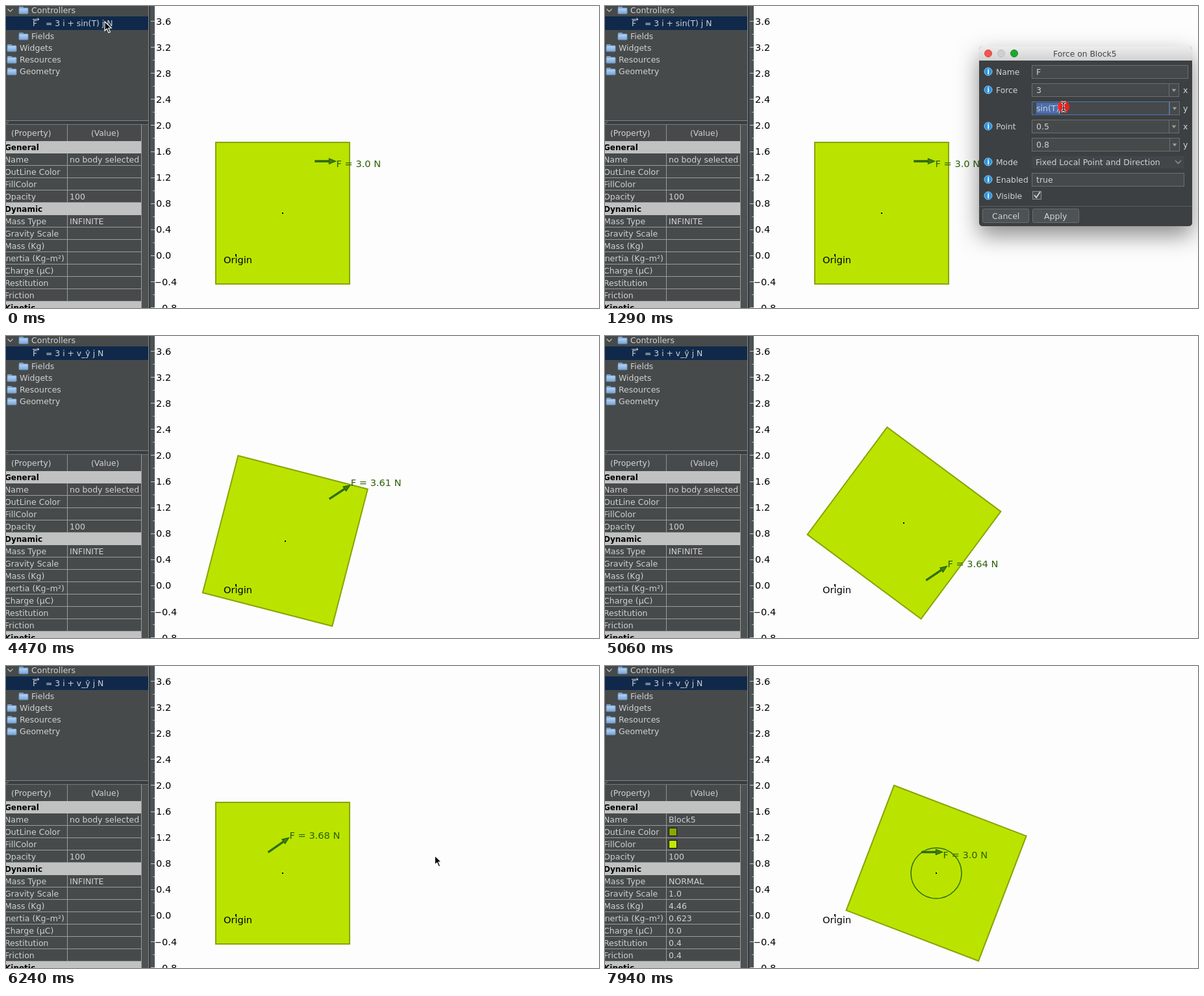
An HTML page with a canvas for the animation above (8000 ms loop, 913 by 465 pixels).

```html
<!DOCTYPE html>
<html>
<head>
<meta charset="utf-8">
<style>
html, body { margin: 0; width: 100%; height: 100%; overflow: hidden; background: #fdfdfd; }
canvas { display: block; }
</style>
</head>
<body>
<canvas id="stage" width="913" height="465"></canvas>
<script>
const c = document.getElementById('stage').getContext('2d');
const LOOP = 8000, FPS = 17, RAD = Math.PI / 180;
const FACE = '"DejaVu Sans", sans-serif';
const RUN1 = 4380, RESET = 5960, SELECT = 6590, RUN2 = 7330;
const DIALOG = 940, DIALOG_END = 3550, MENU_END = 7080;

function text(s, x, y, color = '#d0d2d3', size = 12.5, style = '') {
  c.font = `${style} ${size}px ${FACE}`;
  c.fillStyle = color;
  c.fillText(s, x, y);
}
function rect(x, y, w, h, fill, stroke) {
  if (fill) { c.fillStyle = fill; c.fillRect(x, y, w, h); }
  if (stroke) { c.lineWidth = 1; c.strokeStyle = stroke; c.strokeRect(x + .5, y + .5, w - 1, h - 1); }
}
function rounded(x, y, w, h, r, fill, stroke) {
  c.beginPath();
  c.roundRect(x, y, w, h, r);
  if (fill) { c.fillStyle = fill; c.fill(); }
  if (stroke) { c.lineWidth = 1; c.strokeStyle = stroke; c.stroke(); }
}
function dot(x, y, r, fill, stroke, width = 1) {
  c.beginPath();
  c.arc(x, y, r, 0, 7);
  if (fill) { c.fillStyle = fill; c.fill(); }
  if (stroke) { c.lineWidth = width; c.strokeStyle = stroke; c.stroke(); }
}
function lines(d, color, width = 1, fill) {
  const p = new Path2D(d);
  if (fill) { c.fillStyle = fill; c.fill(p); }
  c.lineWidth = width;
  c.strokeStyle = color;
  c.stroke(p);
}
function at(x, y, draw) {
  c.save();
  c.translate(x, y);
  draw();
  c.restore();
}

// ---- side panels ----
function folder(x, y) {
  rounded(x, y - 5, 7, 4, 1, '#7fa9d6');
  const g = c.createLinearGradient(0, y - 4, 0, y + 6);
  g.addColorStop(0, '#c3dcf5');
  g.addColorStop(1, '#78a6d8');
  rounded(x, y - 3, 14, 9, 1, g, '#6b93c0');
}
function tree(t) {
  rect(0, 0, 220, 177, '#464a4b');
  rect(0, 16, 219, 21, '#10294a');
  lines('M2.5 4.5L6.5 8.5L10.5 4.5', '#b5b8ba', 1.4);
  for (const [s, x, y] of [['Controllers', 20, 6], ['Fields', 20, 46], ['Widgets', 2, 64], ['Resources', 2, 82], ['Geometry', 2, 100]]) {
    folder(x, y);
    text(s, x + 19, y + 5);
  }
  text('F', 41, 31);
  lines('M41 20.5H51M48.5 18.5L51 20.5L48.5 22.5', '#d0d2d3');
  text(t < DIALOG_END ? '= 3 i + sin(T) j N' : '= 3 i + v_ŷ j N', 61, 31, '#d0d2d3', 12.4);
  rect(0, 176, 220, 1, '#808485');
  rect(219, 0, 1, 465, '#858889');
}
const PROPS = [
  ['General'], ['Name', 'no body selected', 'Block5'], ['OutLine Color', '', '#8aa700'],
  ['FillColor', '', '#c0e800'], ['Opacity', '100', '100'], ['Dynamic'],
  ['Mass Type', 'INFINITE', 'NORMAL'], ['Gravity Scale', '', '1.0'], ['Mass (Kg)', '', '4.46'],
  ['Inertia (Kg–m²)', '', '0.623'], ['Charge (µC)', '', '0.0'], ['Restitution', '', '0.4'],
  ['Friction', '', '0.4'], ['Kinetic']
];
function properties(t) {
  rect(0, 177, 220, 288, '#393d3f');
  rect(0, 181, 209, 284, '#464a4b');
  rect(0, 182, 219, 1, '#707475');
  lines('M0 181L4 178', '#999');
  rect(209, 183, 10, 282, '#4d5152');
  text('(Property)', 8, 200, '#d0d2d3', 12.3);
  text('(Value)', 131, 200, '#d0d2d3', 12.3);
  rect(94, 183, 1, 25, '#909394');
  PROPS.forEach(([name, before, after], i) => {
    const y = 208 + i * 19;
    if (before === undefined) {
      rect(0, y, 209, 19, '#c0c1c1');
      text(name, -2, y + 14, '#000', 12, 'bold');
      return;
    }
    rect(0, y + 18, 209, 1, '#9a9d9e');
    rect(94, y, 1, 19, '#9a9d9e');
    text(name, name[0] === 'I' ? -4 : -2, y + 14);
    const value = t < SELECT ? before : after;
    if (value[0] === '#') rect(98, y + 3, 13, 13, value, '#111');
    else text(value, 98, y + 14);
  });
  rect(208, 183, 1, 282, '#9a9d9e');
}
function ruler() {
  rect(220, 0, 9, 465, '#4c5356');
  rect(220, 0, 2, 465, '#333739');
  for (let i = 0; i < 12; i++) {
    const y = 23 + i * 40.1, v = 3.6 - i * .4;
    rect(223, Math.round(y), 6, 1, '#c8cccd');
    rect(226, Math.round(y + 20), 3, 1, '#aeb2b3');
    text(Math.abs(v).toFixed(1), v < -.01 ? 240 : 231, y + 5.5, '#000', 14.6);
    if (v < -.01) text('−', 229, y + 5.5, '#000', 13);
  }
}

// ---- simulated block ----
function pose(t) {
  const p = { x: 426, y: 319, rot: 0, vy: 0, circle: t >= SELECT, idle: t >= SELECT && t < RUN2 };
  if (t >= RUN1 && t < RESET) {
    const u = (t - 4400) / 1000, v = u * u;
    p.x += 54.5 * u - 3.3 * v;
    p.y -= 49.66 * u - 4.07 * v;
    p.rot = 206.9 * u - 22.4 * v;
    p.vy = 2.0 + .1 * u;
  } else if (t >= RESET && t < RUN2) {
    p.vy = 2.13;
  } else if (t >= RUN2) {
    const u = (t - RUN2) / 611;
    p.x += 84 * u;
    p.rot = 110.9 * u;
  }
  return p;
}
function force(x, y, vy) {
  const dx = 31.5, dy = 10.3 * vy, len = Math.hypot(dx, dy);
  at(x, y, () => {
    c.rotate(-Math.atan2(dy, dx));
    lines(`M0 -1H${len - 10}V-4L${len} 0L${len - 10} 4V1H0Z`, '#2a6410', 1.3, '#3f7d12');
  });
  const n = Math.hypot(3, vy);
  text(`F = ${vy ? n.toFixed(2) : '3.0'} N`, x + dx + 1, y - dy + 9 - .36 * dy, '#2b6005', 14.6);
}
function block(t) {
  const p = pose(t);
  at(p.x, p.y, () => {
    c.rotate(p.rot * RAD);
    c.lineWidth = 2;
    c.fillStyle = p.idle ? '#c5e900' : '#bae400';
    c.strokeStyle = p.idle ? '#d9ea96' : '#87a400';
    c.fillRect(-103, -109, 206, 218);
    c.strokeRect(-103, -109, 206, 218);
  });
  rect(Math.round(p.x) - 1, Math.round(p.y) - 1, 2, 2, '#000');
  if (p.circle) dot(p.x, p.y, 39, null, '#2f6a12', 1.5);
  if (t >= RESET) force(p.x - 22, p.y - 32.5, p.vy);
  else {
    const a = p.rot * RAD, co = Math.cos(a), si = Math.sin(a);
    force(p.x + 50 * co + 80 * si, p.y + 50 * si - 80 * co, p.vy);
  }
  rect(353, 382, 2, 3, '#000');
  text('Origin', 335, 396, '#000', 14.6);
}

// ---- dialog ----
function combo(x, y, w) {
  rect(x, y, w, 21, '#45494a', '#6b6f71');
  lines(`M${x + w - 15.5} ${y}v21`, '#6b6f71');
  lines(`M${x + w - 11} ${y + 9}h6l-3 4z`, '#9a9d9f', .5, '#9a9d9f');
}
function dialog(t) {
  c.save();
  c.shadowColor = 'rgba(0,0,0,.45)';
  c.shadowBlur = 34;
  c.shadowOffsetY = 14;
  rounded(576, 62, 328, 277, 5, '#3d4042');
  c.restore();
  const g = c.createLinearGradient(0, 62, 0, 84);
  g.addColorStop(0, '#ededed');
  g.addColorStop(1, '#d2d2d2');
  rounded(576, 62, 328, 22, [5, 5, 0, 0], g);
  dot(590, 73, 5.5, '#f4564f', '#d8443e');
  dot(610, 73, 5.5, '#cfcfcf', '#bdbdbd');
  dot(630, 73, 5.5, '#1fa533', '#168a27');
  text('Force on Block5', 690, 78, '#444', 12.3);
  for (const [s, y] of [['Name', 101], ['Force', 129], ['Point', 185], ['Mode', 240], ['Enabled', 267], ['Visible', 292]]) {
    dot(590, y, 6, '#2b94e0', '#8fcaf3');
    text('i', 588.4, y + 4, '#fff', 10, 'bold');
    text(s, 602, y + 5, '#d0d2d3', 12.3);
  }
  rect(657, 91, 241, 21, '#45494a', '#6b6f71');
  text('F', 664, 106);
  [['3', 119, 'x'], ['', 147, 'y'], ['0.5', 175, 'x'], ['0.8', 203, 'y']].forEach(([s, y, axis], i) => {
    combo(657, y, i % 2 ? 228 : 227);
    text(s, 664, y + 15);
    text(axis, 890, y + 15);
  });
  rect(657, 231, 235, 19, '#424648');
  text('Fixed Local Point and Direction', 663, 245);
  lines('M878 238l4.5 4.5l4.5 -4.5', '#929698', 1.3);
  rect(657, 257, 235, 21, '#45494a', '#6b6f71');
  text('true', 664, 272);
  rect(658, 285, 14, 13, '#484c4e', '#8a8e90');
  lines('M661 291l3 4l6 -9', '#d8dadb', 1.6);

  // edited expression
  const typed = t < 2340 ? 'sin(T)' : t < 3110 ? '' : 'v_y'.slice(0, 1 + Math.floor((t - 3110) / 59));
  const focus = t >= 1230 && t < 3330;
  if (focus) rect(657, 147, 212, 21, null, '#4a78b0');
  c.font = `12.5px ${FACE}`;
  const w = c.measureText(typed).width;
  if (t >= 1230 && t < 2340) rect(664, 149, w, 17, '#4b6eaf');
  text(typed, 664, 162);
  const lit = t < 1705 || (t >= 2175 && t < 2875) || t >= 3110;
  if (focus && lit) rect(Math.round(664 + w), 149, 1, 17, '#d0d2d3');

  rect(576, 308, 328, 1, '#5b5f61');
  rounded(581.5, 312.5, 71, 21, 2, '#4d5254', '#696e70');
  text('Cancel', 596, 328);
  const armed = t >= 3330;
  rounded(658.5, 312.5, 71, 21, 2, armed ? '#55606b' : '#4d5254', armed ? '#5580b0' : '#696e70');
  text('Apply', 676, 328);
}
function keyCap(t) {
  if (t < 2340 || t >= 3760) return;
  c.globalAlpha = Math.min(1, (3760 - t) / 180);
  rounded(440, 418, 33, 27, 12, '#6c6c6c');
  c.textAlign = 'center';
  text(t < 3110 ? '⌫' : t < 3165 ? 'v' : t < 3225 ? '_' : 'y', 456.5, 437, '#f0f0f0', 13);
  c.textAlign = 'left';
  c.globalAlpha = 1;
}

// ---- context menu ----
const ICONS = {
  93: 'M490 95l2 -5l9 -9l3 3l-9 9zM499 83l3 3',
  119: 'M495 106h11v11h-11zM494 111a5.5 5.5 0 1 0 6 6',
  197: 'M491 184l12 13M503 184l-12 13M488 198a2.5 2.5 0 1 0 5 0a2.5 2.5 0 1 0 -5 0M501 198a2.5 2.5 0 1 0 5 0a2.5 2.5 0 1 0 -5 0',
  223: 'M494 212h12v15h-12zM491 223v-14h11',
  249: 'M490 237h15v15h-15zM494 234h7v4h-7z',
  275: 'M491 267h13l-1 11h-11zM490 264h15M495 262h5M495 270l5 5M500 270l-5 5'
};
const MENU = [['Edit', 93, 1], ['Add Fixture', 119, 1], ['Selection', 146, 1], ['Action', 171, 1],
  ['Cut', 197], ['Copy', 223], ['Paste', 249], ['Delete', 275], ['Reset', 301, 1]];
const SUB = [['Move to Origin', 302], ['Reset Velocities', 325], ['Reset Forces/Torques', 348],
  ['Reset all Tracers', 371], ['Remove all Tracers', 394], ['Remove all Joints', 418]];
const CREAM = '#f7f6d2', ORANGE = '#f59c00', EDGE = '#b97b14';
function menu(t) {
  const open = t >= 6760;
  rect(484, 75, 136, 236, '#67676a', EDGE);
  if (open) rect(485, 285, 134, 25, ORANGE);
  for (const y of [128, 155, 180]) rect(485, y, 134, 1, EDGE);
  for (const [s, y, more] of MENU) {
    const color = open && s === 'Reset' ? '#111' : CREAM;
    text(s, s === 'Action' || s === 'Reset' ? 490 : 512, y, color, 14.2);
    if (more) lines(`M609 ${y - 8}l4 3.5l-4 3.5z`, color, .3, color);
    if (ICONS[y]) lines(ICONS[y], '#c4c4c6', 1.8);
  }
  c.setLineDash([2, 2]);
  lines('M491 134h14v14h-14z', '#c4c4c6', 1.6);
  c.setLineDash([]);
  if (!open) return;
  rect(617, 287, 167, 142, '#67676a', EDGE);
  rect(617, 426, 167, 3, '#c78412');
  rect(618, 403, 165, 1, EDGE);
  const hot = t >= 6860 ? 1 : 0;
  rect(618, SUB[hot][1] - 15, 165, 23, ORANGE);
  SUB.forEach(([s, y], i) => text(s, 621, y, i === hot ? '#111' : CREAM, 14));
}

// ---- pointer ----
const ROUTE = [[0, 152, 24], [60, 152, 24], [420, 252, 76], [800, 147, 28], [940, 147, 28], [1240, 706, 155],
  [3130, 706, 155], [3300, 682, 327], [3560, 682, 327], [3860, 930, 30], [5830, 930, 50], [6000, 880, 246],
  [6240, 660, 292], [6500, 660, 292], [6590, 486, 296], [6650, 486, 296], [6760, 560, 297],
  [6900, 706, 316], [7060, 706, 316], [7280, 930, 60], [LOOP, 930, 60]];
const CLICKS = [800, 1250, 3290, 6530, 6990];
function pointer(t) {
  const i = ROUTE.findIndex(k => k[0] > t);
  const [t0, x0, y0] = ROUTE[i - 1], [t1, x1, y1] = ROUTE[i];
  let k = (t - t0) / (t1 - t0);
  k = k * k * (3 - 2 * k);
  const x = x0 + (x1 - x0) * k, y = y0 + (y1 - y0) * k;
  for (const s of CLICKS) {
    const age = (t - s) / 260;
    if (age > 0 && age < 1) dot(x, y, 18 * Math.sin(age * Math.PI), 'rgba(255,28,28,.88)');
  }
  if (t >= 1230 && t < 3160) {
    const d = 'M-4 -7Q0 -7 0 -4Q0 -7 4 -7M0 -4V5M-4 7Q0 7 0 4Q0 7 4 7M-2 2H2';
    at(x, y, () => { lines(d, '#fff', 3); lines(d, '#000', 1.2); });
  } else {
    at(x, y, () => lines('M0 0V14L3.4 11L6 17L8.4 16L5.8 10H10.3Z', '#fff', 1.2, '#000'));
  }
}

function draw(now) {
  const t = Math.floor(((now % LOOP) + 6) * FPS / 1000) * 1000 / FPS % LOOP;
  rect(0, 0, 913, 465, '#fdfdfd');
  block(t);
  ruler();
  properties(t);
  tree(t);
  if (t >= DIALOG && t < DIALOG_END) dialog(t);
  keyCap(t);
  if (t >= SELECT && t < MENU_END) menu(t);
  pointer(t);
}
const start = performance.now();
function tick() {
  draw(performance.now() - start);
  requestAnimationFrame(tick);
}
tick();
</script>
</body>
</html>
```
